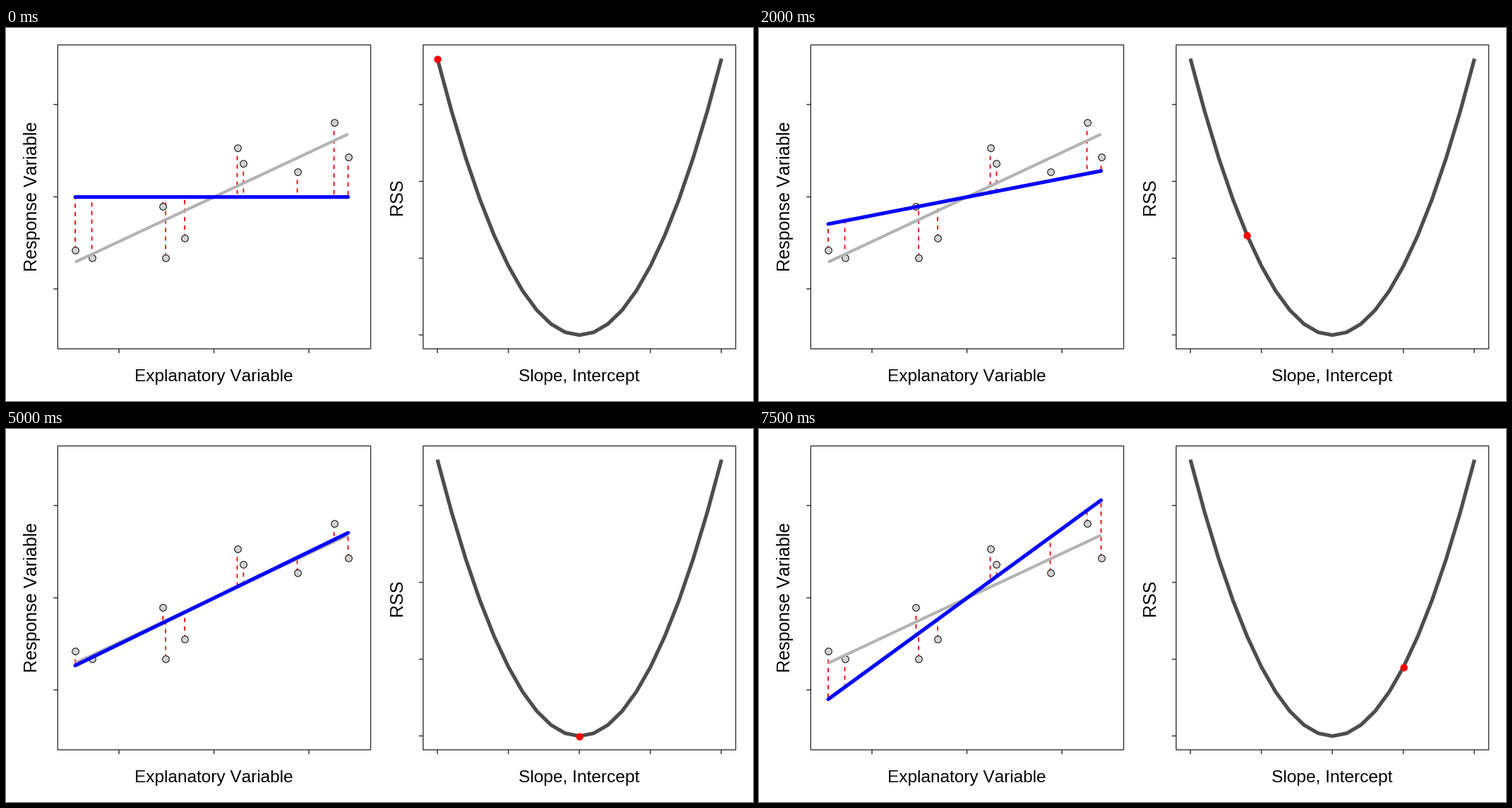
These frames come from a looping animation (1058x529 px, 8000 ms). A matplotlib script:

```python
import numpy as np
import matplotlib.pyplot as plt
from matplotlib.animation import FuncAnimation
from matplotlib.patches import Rectangle

W, H, DPI = 1058, 529, 100
PX = 72 / DPI  # points per pixel
STEPS = 16

plt.rcParams["font.family"] = "Liberation Sans"
plt.rcParams["text.kerning_factor"] = 6

fig = plt.figure(figsize=(W / DPI, H / DPI), dpi=DPI, facecolor="white")
ax = fig.add_axes([0, 0, 1, 1])
ax.set_xlim(0, W)
ax.set_ylim(H, 0)
ax.axis("off")


def line(xs, ys, color, width, z, cap="butt", **kw):
    return ax.plot(xs, ys, color=color, lw=width * PX, zorder=z, snap=False,
                   solid_capstyle=cap, solid_joinstyle="round", **kw)[0]


def panel(left, right, xticks, yticks):
    top, bottom = 24, 455
    ax.add_patch(Rectangle((left, top), right - left, bottom - top, fill=False,
                           ec="#333333", lw=1.4 * PX, zorder=1, snap=False))
    for x in xticks:
        line([x, x], [bottom, bottom + 6], "#333333", 1.5, 1)
    for y in yticks:
        line([left - 6, left], [y, y], "#333333", 1.5, 1)


def label(x, y, text, size, rotation=0):
    if rotation:
        ha, va = "right", "center"
    else:
        ha, va = "center", "baseline"
    ax.text(x, y, text, fontsize=size * PX, rotation=rotation, ha=ha, va=va,
            color="black")


panel(73.3, 516.5, (160, 294.5, 429), (108.5, 239.5, 370))
panel(590.8, 1033.5, (611, 711.6, 812, 912.6, 1013), (108.5, 217.5, 326.5, 435.3))
label(294.5, 500.5, "Explanatory Variable", 24.4)
label(812, 500.5, "Slope, Intercept", 24.5)
label(49, 239.2, "Response Variable", 25.1, 90)
label(566, 239.2, "RSS", 25.1, 90)

# scatter and fitted line
px = np.array([98, 121.5, 222.3, 226, 253, 327.5, 336.3, 412.5, 464.5, 484.5])
py = np.array([315, 325.5, 253, 325.5, 298, 169.5, 191.5, 203.5, 134, 183])
ax.plot(px, py, "o", ms=9.6 * PX, mfc="#d3d3d3", mec="black",
        mew=1.0 * PX, zorder=3, snap=False)
line([98, 484.5], [332, 150.5], "#b3b3b3", 4.2, 4)

# residuals start at the points, so the dashes stay put
RED_WIDTH = 1.8
dash = 6 / RED_WIDTH
residuals = [line([x, x], [y, y], "red", RED_WIDTH, 2, dashes=(dash, dash),
                  dash_capstyle="butt") for x, y in zip(px, py)]

X0, Y0 = 294.6, 239.7
UNIT_X, UNIT_Y = 134.5, 131
ends = np.array([98, 484.5])
model = line(ends, [Y0, Y0], "blue", 5.2, 5, cap="round")


def predict(x, slope):
    return Y0 - (x - X0) * slope * UNIT_Y / UNIT_X


# loss curve
def loss(step):
    return 611 + 20.12 * step, 435.5 - 3.92 * (step - 10) ** 2


line(*loss(np.arange(21)), "#4d4d4d", 5.2, 3)
dot, = ax.plot([], [], "o", color="red", ms=10.4 * PX, mew=0, zorder=5,
               snap=False)


def update(step):
    slope = 0.05 * step
    model.set_ydata(predict(ends, slope))
    for seg, x, y in zip(residuals, px, py):
        seg.set_ydata([y, predict(x, slope)])
    x, y = loss(step)
    dot.set_data([x], [y])
    return [model, dot, *residuals]


anim = FuncAnimation(fig, update, frames=STEPS, interval=500, repeat=True,
                     repeat_delay=0, blit=False)
plt.show()
```
